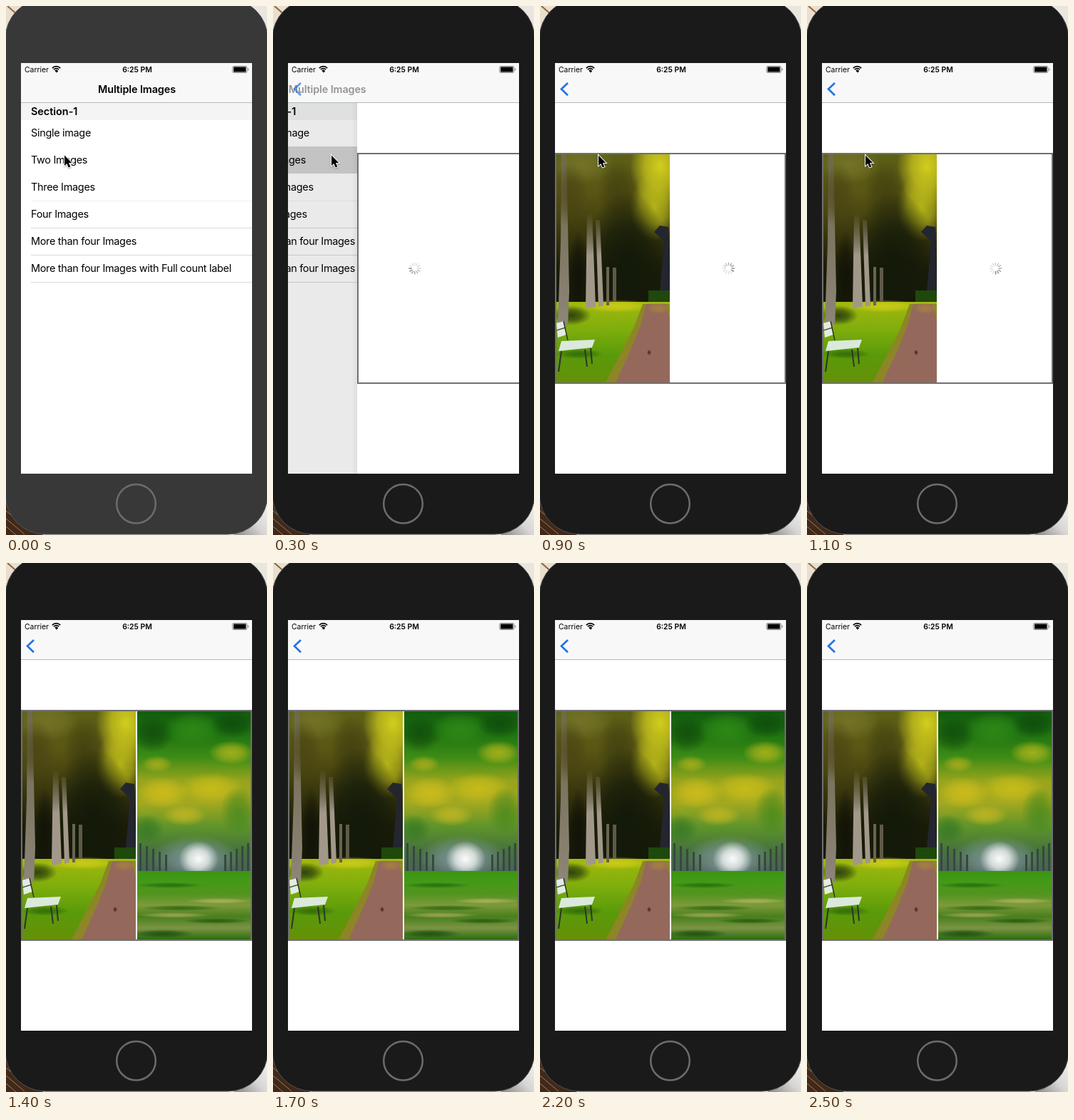
An HTML page with a canvas for the animation above (2600 ms loop, 366 px wide and 742 px high).

```html
<!DOCTYPE html>
<html lang="en">
<head>
<meta charset="utf-8">
<title>Multiple Images</title>
<style>
html, body { margin: 0; width: 100%; height: 100%; overflow: hidden; background: #ddd; }
canvas { display: block; width: 366px; height: 742px; }
</style>
</head>
<body>
<canvas id="stage" width="366" height="742"></canvas>
<script>
const ctx = document.getElementById('stage').getContext('2d');
const LOOP = 2600, STEP = 100;
const SCREEN = { x: 21, y: 80, w: 324, h: 576 };
const FONT = 'Inter, Roboto, sans-serif';
const ROWS = ['Single image', 'Two Images', 'Three Images', 'Four Images',
  'More than four Images', 'More than four Images with Full count label'];

function rect(x, y, w, h, fill) {
  ctx.fillStyle = fill;
  ctx.fillRect(x, y, w, h);
}

function poly(fill, ...p) {
  ctx.beginPath();
  for (let i = 0; i < p.length; i += 2) ctx.lineTo(p[i], p[i + 1]);
  ctx.closePath();
  ctx.fillStyle = fill;
  ctx.fill();
}

function line(color, width, ...p) {
  ctx.beginPath();
  for (let i = 0; i < p.length; i += 2) ctx.lineTo(p[i], p[i + 1]);
  ctx.strokeStyle = color;
  ctx.lineWidth = width;
  ctx.stroke();
}

function text(str, x, y, size, weight = 400, tracking = 0, align = 'left') {
  ctx.font = `${weight} ${size}px ${FONT}`;
  ctx.letterSpacing = tracking + 'px';
  ctx.textAlign = align;
  ctx.fillStyle = '#000';
  ctx.fillText(str, x, y);
}

function gradient(x0, y0, x1, y1, ...stops) {
  const g = ctx.createLinearGradient(x0, y0, x1, y1);
  stops.forEach((c, i) => g.addColorStop(i / (stops.length - 1), c));
  return g;
}

const vertical = (y0, y1, ...stops) => gradient(0, y0, 0, y1, ...stops);

// Soft elliptical patch of colour, given as "r,g,b".
function glow(x, y, rx, ry, rgb, alpha = 1) {
  ctx.save();
  ctx.translate(x, y);
  ctx.scale(rx, ry);
  const g = ctx.createRadialGradient(0, 0, 0, 0, 0, 1);
  g.addColorStop(0, `rgba(${rgb},${alpha})`);
  g.addColorStop(0.5, `rgba(${rgb},${alpha * 0.7})`);
  g.addColorStop(1, `rgba(${rgb},0)`);
  ctx.fillStyle = g;
  ctx.fillRect(-1, -1, 2, 2);
  ctx.restore();
}

function clipped(x, y, w, h, draw) {
  ctx.save();
  ctx.beginPath();
  ctx.rect(x, y, w, h);
  ctx.clip();
  draw();
  ctx.restore();
}

function desktop() {
  rect(0, 0, 366, 742, '#e9e5df');
  rect(320, 680, 46, 62, gradient(328, 742, 366, 706, '#949494', '#d8d6d4', '#efedeb'));
  poly('#eadfce', 0, 0, 26, 0, 0, 30);
  line('#8a6440', 2, 2, 0, 18, 14);
  poly('#40291a', 0, 680, 52, 742, 0, 742);
  for (let i = 0; i < 3; i++) line('#a27a52', 1, 0, 708 + i * 11, 26, 730 + i * 11);
}

function phone(bezel) {
  ctx.beginPath();
  ctx.roundRect(-1, -10, 368, 751, 56);
  ctx.fillStyle = bezel;
  ctx.fill();
  ctx.strokeStyle = '#555';
  ctx.lineWidth = 1;
  ctx.stroke();
  ctx.beginPath();
  ctx.arc(182.5, 698.2, 27.3, 0, Math.PI * 2);
  ctx.strokeStyle = '#6c6c6c';
  ctx.lineWidth = 2.5;
  ctx.stroke();
}

function list(highlight, dim) {
  rect(21, 136, 324, 520, '#fff');
  rect(21, 136, 324, 24, '#f3f5f5');
  text('Section-1', 35, 153, 14.4, 600);
  if (highlight) rect(21, 197, 324, 38, '#d4d4d4');
  ROWS.forEach((label, i) => {
    const y = 160 + i * 38;
    text(label, 35, y + 23, 14.4, 400, -0.28);
    if (i > 1) rect(35, y + 37, 310, 1, i === 2 ? '#f0f0f0' : '#d9d9d9');
  });
  rect(21, 136, 324, 520, `rgba(0,0,0,${dim})`);
}

function spinner(x, y, t) {
  const head = Math.floor(9 + (t - 300) * 0.012 + 12);
  ctx.lineCap = 'round';
  for (let i = 0; i < 12; i++) {
    const a = (head - i) * Math.PI / 6;
    const s = Math.sin(a), c = -Math.cos(a);
    const shade = Math.min(226, 135 + i * 12);
    line(`rgb(${shade},${shade},${shade})`, 1.5,
      x + s * 4.6, y + c * 4.6, x + s * 8, y + c * 8);
  }
  ctx.lineCap = 'butt';
}

function parkPath() {
  rect(23, 208, 159, 320, vertical(208, 420, '#5c6016', '#5a5614', '#3c3a0e', '#1c1d08', '#15180a'));
  glow(58, 222, 45, 28, '130,128,50', 0.6);
  glow(168, 225, 42, 58, '216,212,30', 0.95);
  glow(160, 282, 34, 48, '196,196,26', 0.85);
  glow(110, 265, 30, 50, '58,58,14', 0.7);
  glow(122, 355, 58, 95, '18,25,9', 0.95);
  glow(54, 375, 14, 60, '16,18,8', 0.8);
  // arch, hedge and lawn
  poly('#23262e', 160, 317, 168, 308, 180, 310, 182, 400, 168, 400, 174, 330);
  rect(152, 399, 30, 17, '#1f480c');
  rect(23, 415, 159, 113, vertical(415, 528, '#a2b80e', '#7fae0c', '#5a9a0a', '#659008'));
  glow(108, 421, 52, 9, '210,206,24', 0.85);
  glow(44, 434, 28, 14, '30,50,10', 0.85);
  glow(55, 488, 34, 7, '36,92,8', 0.7);
  poly('#8d8626', 144, 418, 182, 418, 182, 528, 92, 528, 118, 478, 132, 450);
  poly('#94695c', 149, 418, 176, 418, 182, 440, 182, 528, 106, 528, 128, 480, 141, 448);
  glow(166, 424, 16, 8, '176,140,50', 0.6);
  glow(153, 486, 3, 4, '60,35,30', 0.9);
  // birch trunks, fading into the leaves above
  const bark = vertical(290, 350, 'rgba(158,148,134,0)', '#a29889');
  poly(vertical(208, 445, '#6e6a48', '#7d7662', '#8d8678'), 30, 208, 37, 208, 41, 400, 39, 448, 25, 448, 29, 330);
  poly(bark, 66, 290, 73, 290, 78, 422, 64, 424);
  poly(bark, 78, 300, 84, 300, 89, 420, 82, 422);
  rect(93, 366, 4, 54, '#6a6451');
  rect(102, 367, 5, 48, '#5f5a48');
  glow(42, 265, 26, 45, '72,66,20', 0.7);
  // bench
  line('#2e3528', 2, 30, 484, 26, 513);
  line('#2e3528', 2, 63, 482, 66, 506);
  line('#2e3528', 2, 71, 480, 73, 502);
  poly('#e3ece4', 23, 445, 33, 442, 37, 461, 25, 465);
  line('#4c5c40', 1.5, 23, 455, 36, 451);
  line('#2e3528', 1.5, 33, 442, 39, 469);
  poly('#dae9dc', 30, 470, 77, 468, 73, 479, 26, 484);
}

function leafyAvenue() {
  rect(184, 208, 159, 320, vertical(208, 434,
    '#125c0e', '#1f7410', '#3d8c16', '#96a41c', '#a2a820', '#5f942a', '#47743c', '#4a6058'));
  glow(206, 240, 30, 26, '14,66,10', 0.7);
  glow(262, 232, 40, 24, '52,146,24', 0.7);
  glow(318, 226, 32, 20, '14,72,12', 0.8);
  glow(316, 266, 32, 17, '196,188,28', 0.75);
  glow(212, 282, 22, 12, '190,178,26', 0.7);
  glow(220, 322, 38, 22, '214,192,28', 0.8);
  glow(288, 316, 46, 22, '212,194,26', 0.75);
  glow(250, 354, 32, 15, '204,186,34', 0.75);
  glow(326, 348, 26, 34, '60,132,28', 0.7);
  glow(198, 374, 24, 22, '52,120,36', 0.8);
  // misty tunnel
  glow(266, 414, 62, 32, '130,152,160', 0.85);
  glow(270, 415, 28, 25, '250,252,250', 1);
  for (let i = 0; i < 5; i++) {
    rect(187 + i * 9, 393 + i * 4, 3, 42 - i * 4, '#37483f');
    rect(338 - i * 8, 393 + i * 4, 3, 42 - i * 4, '#37483f');
  }
  rect(184, 432, 159, 96, vertical(432, 528,
    '#3a9612', '#459a16', '#51941f', '#7d9a3a', '#487f1c', '#7c9444', '#2b6c10'));
  glow(230, 452, 48, 4, '28,104,14', 0.8);
  glow(300, 474, 48, 4, '186,180,104', 0.8);
  glow(245, 484, 56, 4, '36,98,14', 0.8);
  glow(236, 494, 52, 4, '180,174,104', 0.75);
  glow(295, 502, 48, 4, '30,84,12', 0.8);
  glow(220, 520, 44, 6, '22,74,12', 0.8);
}

function gallery(t) {
  rect(21, 136, 324, 520, '#fff');
  ctx.strokeStyle = '#707070';
  ctx.lineWidth = 2;
  ctx.strokeRect(22, 207, 322, 322);
  if (t >= 900) clipped(23, 208, 159, 320, parkPath);
  else spinner(101.8, 368, t);
  if (t >= 1300) clipped(184, 208, 159, 320, leafyAvenue);
  else spinner(264.5, 368, t);
}

function statusBar() {
  text('Carrier', 26, 92.7, 10.4);
  text('6:25 PM', 184, 92.7, 10.4, 600, 0, 'center');
  for (let r = 3; r < 10; r += 2.9) {
    ctx.beginPath();
    ctx.arc(70.5, 92.7, r - 0.8, -Math.PI * 0.75, -Math.PI * 0.25);
    if (r === 3) ctx.lineTo(70.5, 93);
    ctx.strokeStyle = ctx.fillStyle = '#000';
    ctx.lineWidth = 1.7;
    if (r === 3) ctx.fill();
    ctx.stroke();
  }
  ctx.beginPath();
  ctx.roundRect(317.5, 84.5, 20.5, 9, 2);
  ctx.strokeStyle = '#8a8a8a';
  ctx.lineWidth = 1;
  ctx.stroke();
  rect(319, 85.5, 17.5, 7, '#000');
  rect(339.3, 87.5, 1, 3, '#777');
}

function navBar(left) {
  rect(21, 80, 324, 55, '#f8f8f8');
  rect(21, 135, 324, 1, '#b8b8b8');
  statusBar();
  const shown = 1 - left;
  if (left > 0.01) {
    ctx.globalAlpha = Math.pow(left, 0.75);
    text('Multiple Images', 183.5 - 153 * shown, 121.6, 14.4, 600, -0.1, 'center');
  }
  ctx.globalAlpha = shown;
  line('#2374e4', 2.7, 39, 108, 30, 116.6, 39, 125.2);
  ctx.globalAlpha = 1;
}

function cursor(x, y) {
  ctx.save();
  ctx.translate(x, y);
  ctx.beginPath();
  const p = [0, 0, 0, 14.5, 3.3, 11.5, 5.7, 17, 8.3, 15.9, 6, 10.6, 10.3, 10.6];
  for (let i = 0; i < p.length; i += 2) ctx.lineTo(p[i], p[i + 1]);
  ctx.closePath();
  ctx.shadowColor = 'rgba(0,0,0,.35)';
  ctx.shadowBlur = 2;
  ctx.shadowOffsetY = 1;
  ctx.strokeStyle = '#fff';
  ctx.lineWidth = 2;
  ctx.stroke();
  ctx.shadowColor = 'transparent';
  ctx.fillStyle = '#000';
  ctx.fill();
  ctx.restore();
}

// Share of the push still to go: a critically damped spring.
function pushLeft(t) {
  if (t > 600) return 0;
  const s = Math.max(0, t - 150) * 0.0163;
  return (1 + s) * Math.exp(-s);
}

function draw(t) {
  const left = pushLeft(t);
  const offset = Math.round(left * SCREEN.w);
  desktop();
  phone(t < 100 ? '#383838' : '#1a1a1a');
  clipped(SCREEN.x, SCREEN.y, SCREEN.w, SCREEN.h, () => {
    if (offset > 0) {
      ctx.save();
      ctx.translate(-0.3 * (SCREEN.w - offset), 0);
      // wide enough to stay covered while the list slides away
      rect(SCREEN.x, 136, SCREEN.w * 1.3, 520, '#fff');
      list(t >= 100, 0.12 * (1 - left));
      ctx.restore();
      const edge = SCREEN.x + offset;
      if (left < 1) {
        rect(edge - 8, 136, 8, 520, gradient(edge - 8, 0, edge, 0, 'rgba(0,0,0,0)', 'rgba(0,0,0,.05)'));
      }
    }
    if (left < 1) {
      ctx.save();
      ctx.translate(offset, 0);
      gallery(t);
      ctx.restore();
    }
    navBar(left);
    if (t < 1300) cursor(82, 209.5);
  });
}

const start = performance.now();
function tick() {
  const t = (performance.now() - start) % LOOP;
  draw(Math.floor(t / STEP) * STEP);
  requestAnimationFrame(tick);
}
tick();
</script>
</body>
</html>
```
